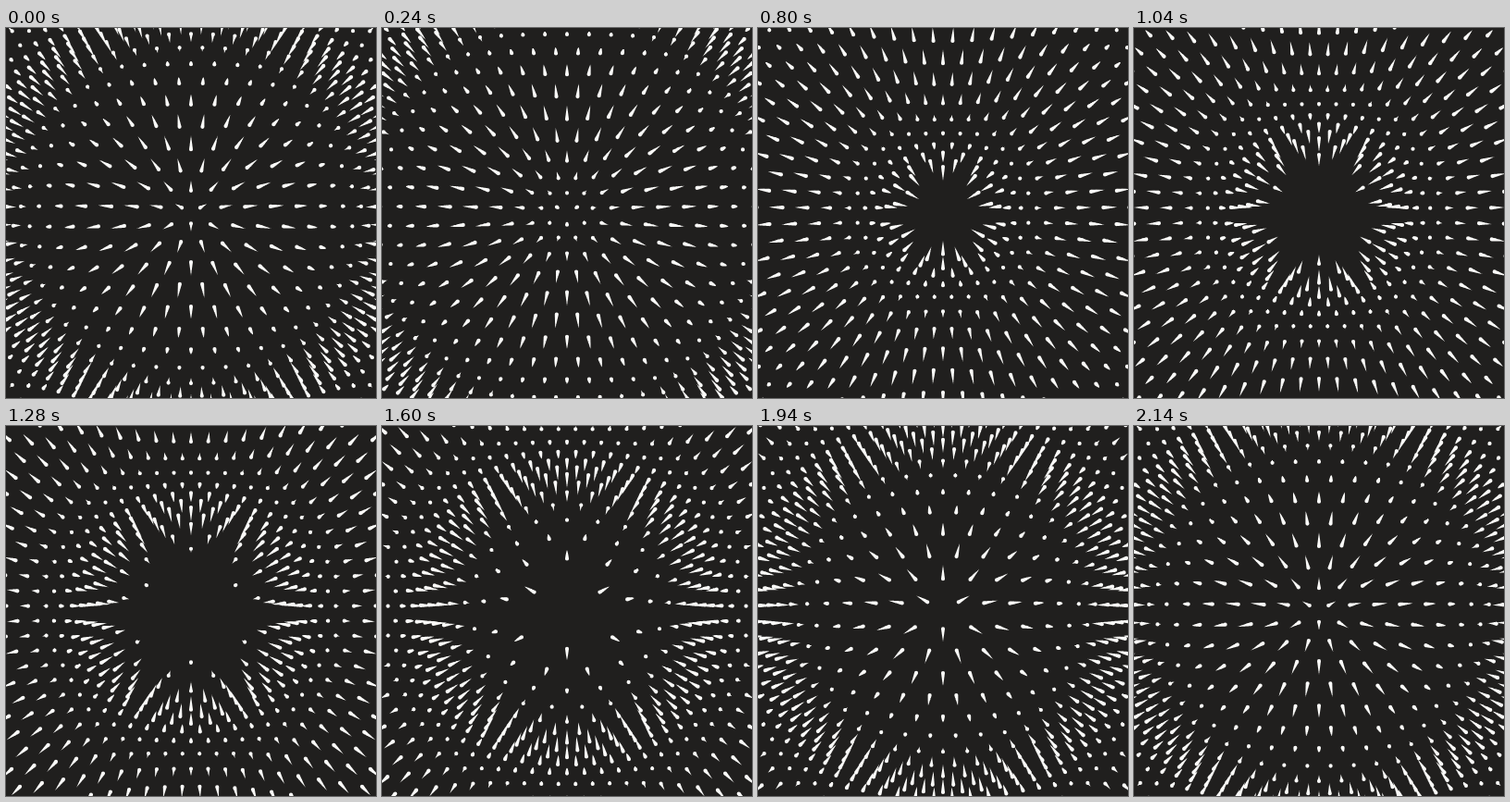
Animation, 400 px wide and 400 px high, one loop 2160 ms. Source, as an HTML page with a canvas:

```html
<!DOCTYPE html>
<html>
<head>
<meta charset="utf-8">
<style>
html, body { margin: 0; width: 100%; height: 100%; overflow: hidden; background: #201f1e; }
canvas { display: block; }
</style>
</head>
<body>
<canvas id="stage" width="400" height="400"></canvas>
<script>
const ctx = document.getElementById('stage').getContext('2d');
const TAU = Math.PI * 2;
const LOOP = 2160, STEP = 20;
const SPACING = 18.4, WAVE = 272, PUSH = 46;
const LEAD = 105, TRAIL = 230, BEADS = 20, HEAD = 2.1, TAIL = 0.1;

// Triangular lattice centred on the middle of one triangle
const dots = [];
const unit = SPACING / Math.sqrt(3);
for (let row = -22; row <= 22; row++) {
  const y = unit * (1 + 1.5 * row);
  for (let col = -18; col <= 18; col++) {
    const x = SPACING * (col + (row & 1) / 2);
    const r = Math.hypot(x, y);
    if (r < 300) dots.push({ r, cos: x / r, sin: y / r });
  }
}

// Radius of a dot as the wave spreads outwards
const radiusAt = (r, ms) =>
  r + PUSH / 2 * (1 - Math.cos(TAU * ((r + 14) / WAVE - ms / LOOP)));

function draw(ms) {
  ctx.fillStyle = '#201f1e';
  ctx.fillRect(0, 0, 400, 400);
  ctx.fillStyle = '#fafaf8';
  ctx.beginPath();
  for (const { r, cos, sin } of dots) {
    for (let i = 0; i <= BEADS; i++) {
      const k = i / BEADS;
      const d = radiusAt(r, ms + LEAD - (1 - k) * TRAIL);
      const x = 200 + d * cos, y = 200 + d * sin;
      const size = TAIL + (HEAD - TAIL) * k;
      ctx.moveTo(x + size, y);
      ctx.arc(x, y, size, 0, TAU);
    }
  }
  ctx.fill();
}

const start = performance.now();
function tick() {
  const ms = (performance.now() - start) % LOOP;
  draw(Math.floor(ms / STEP) * STEP);
  requestAnimationFrame(tick);
}
tick();
</script>
</body>
</html>
```
